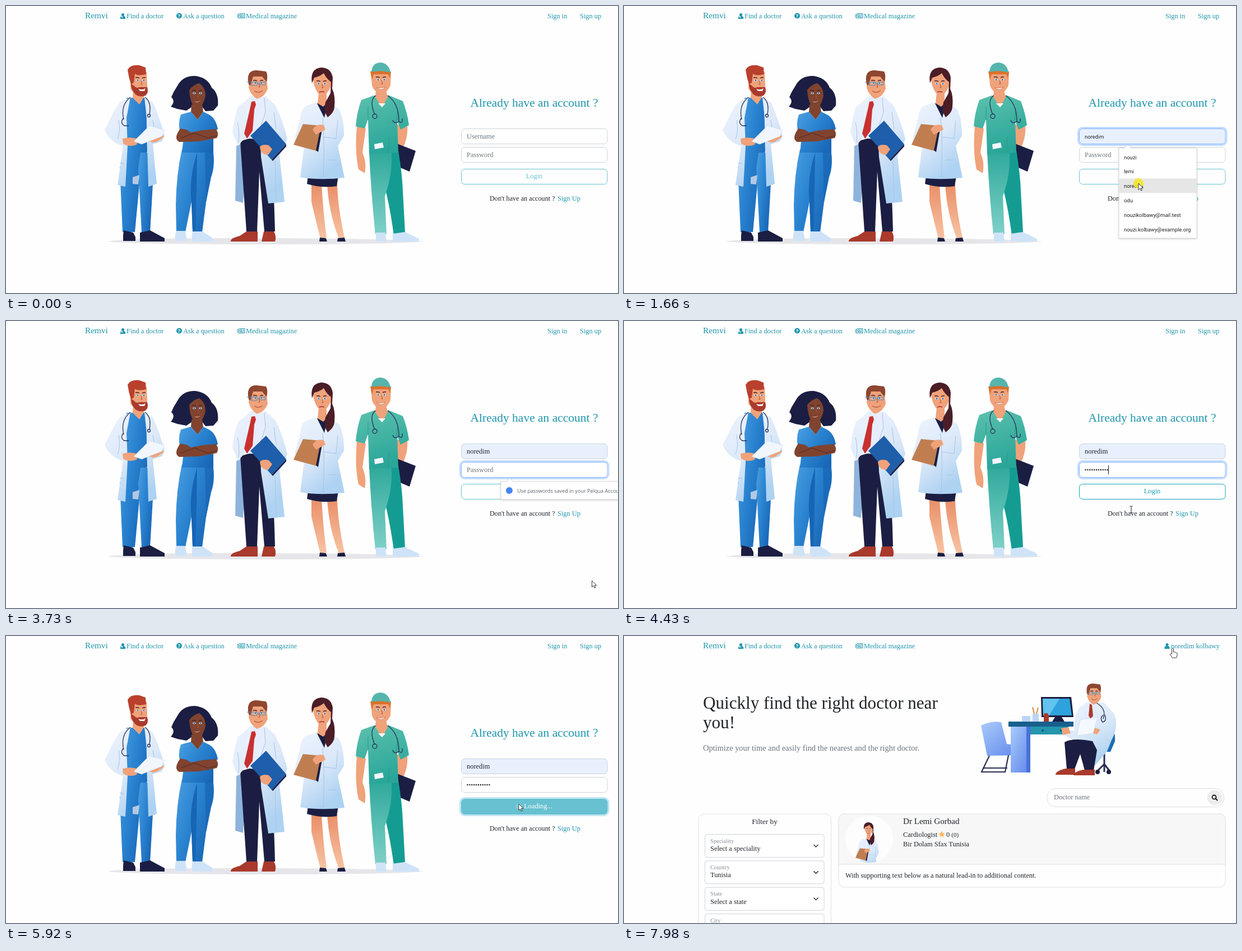
Animation of 1092 by 513 pixels, one loop 8 s. Source, as an HTML page:

```html
<!DOCTYPE html>
<html lang="en">
<head>
<meta charset="utf-8">
<title>Doctor finder</title>
<style>
html, body { margin: 0; width: 100%; height: 100%; overflow: hidden; background: #fefefe; }
svg { display: block; width: 100vw; height: 100vh; }
text { font: 12.4px "Liberation Serif", serif; fill: #212529; }
.teal, .teal text { fill: #2196ad; }
.gray { fill: #6c757d; }
.label { font-size: 10.6px; fill: #868d94; }
.ui text, text.ui { font: 9.4px Roboto, sans-serif; fill: #222; }
.mid { text-anchor: middle; }
.box { fill: #fff; stroke: #ced4da; }
.card { fill: none; stroke: #dfdfdf; }
.pop { fill: #fff; stroke: #d9d9d9; filter: drop-shadow(0 1px 1.5px #0003); }
.ring { fill: none; stroke: #c2dbfe; stroke-width: 3; }
.line { fill: none; stroke: #2b2f55; stroke-width: 1.3; }
.fold { fill: none; stroke: #a9c3e6; }
.skin { fill: #f0a27a; }
.brown { fill: #80432f; }
.navy { fill: #1b1e42; }
.red { fill: #a93a2c; }
.coat { fill: url(#coat); }
.blue { fill: url(#blue); }
.dark { fill: #1765b5; }
.green { fill: url(#green); }
.shoe { fill: #cfe3f8; }
</style>
</head>
<body>
<svg viewBox="0 0 1092 513" preserveAspectRatio="none">
<defs>
  <linearGradient id="coat" x2=".5" y2="1"><stop stop-color="#eef3fe"/><stop offset=".55" stop-color="#dce9f9"/><stop offset="1" stop-color="#aed2f2"/></linearGradient>
  <linearGradient id="blue" x2="1" y2=".7"><stop stop-color="#4a9fe2"/><stop offset=".5" stop-color="#2a83d0"/><stop offset="1" stop-color="#1765b5"/></linearGradient>
  <linearGradient id="green" x2=".3" y2="1"><stop stop-color="#5cc1ae"/><stop offset="1" stop-color="#2aa699"/></linearGradient>
  <linearGradient id="mint" x2="0" y2="1"><stop stop-color="#2fa99b"/><stop offset="1" stop-color="#7fd0c8"/></linearGradient>
  <linearGradient id="leg" x2="0" y2="1"><stop stop-color="#e98f68"/><stop offset="1" stop-color="#f8c3a3"/></linearGradient>
  <linearGradient id="sky" x2="1" y2="1"><stop stop-color="#a9cbfa"/><stop offset="1" stop-color="#5f86ec"/></linearGradient>
  <clipPath id="round"><circle cx="437.5" cy="363" r="42.5"/></clipPath>
  <g id="eyes">
    <path fill="#fff" d="M-8 1q3-4 6 0q-3 3-6 0M3 1q3-4 6 0q-3 3-6 0"/>
    <circle cx="-5" cy=".8" r="1.5" fill="#246fae"/><circle cx="6" cy=".8" r="1.5" fill="#246fae"/>
    <path fill="none" stroke="#4a2328" stroke-width="1.5" d="M-9-4q4-1 7 1M3-3q3-2 6-1"/>
    <path fill="none" stroke="#a5543c" d="M1 2l2 6h-3"/>
  </g>
  <g id="user"><circle cx="4.5" cy="2.6" r="2.6"/><path d="M0 10V8q0-3 3-3h3q3 0 3 3v2z"/></g>
</defs>

<g class="teal">
  <text x="141" y="22" style="font-size:15.3px">Remvi</text>
  <use href="#user" x="204" y="13"/><path stroke="#fff" d="M207 18v3M205.500 19.500h3"/>
  <text x="215" y="22">Find a doctor</text>
  <circle cx="309" cy="17.500" r="5"/><text x="309" y="21" class="mid" style="font:bold 9px Open Sans,sans-serif;fill:#fff">?</text>
  <text x="316" y="22">Ask a question</text>
  <path fill="none" stroke="#2196ad" d="M415.500 13.500h10.500v8h-11q-1.500 0-1.500-1.500v-5h2v5M417.500 15.500h3v2.500h-3zM422 15.500h2.500M422 17.500h2.500M417 19.500h7.500"/>
  <text x="428" y="22">Medical magazine</text>
</g>

<g id="login">
  <g class="teal"><text x="966" y="22">Sign in</text><text x="1024" y="22">Sign up</text></g>
  <path fill="#e6e6ea" d="M181 421Q210 414 460 415T747 421Q690 426 460 426T181 421z"/>

  <g id="bearded">
    <path class="blue" d="M203 290L208 404H230L239 308 238 288 252 260 250 164H215L212 250z"/>
    <path class="blue" d="M236 290L242 405H257L263 300 262 262 240 262z"/>
    <path class="navy" d="M210 401l17 4 4 8v7h-22v-10zM239 405l18-4 26 14v6h-44z"/>
    <path fill="#b3c8e4" d="M226 306l12-4-2 17-10-1z"/>
    <path class="coat" d="M222 163L203 172C192 186 186 204 176 221Q184 243 209 250L199 320 213 323 217 250 215 200zM247 163L262 172Q274 198 283 232L278 242 262 247 269 318 254 323 252 250 251 200z"/>
    <path class="fold" d="M201 204q4 20-2 34M262 204q4 18 0 42M203 280l8 2"/>
    <path class="skin" d="M227 148h19v15l-8 13-12-12zM208 237q16-4 28 1l-3 10q-14 5-24-2zM250 236l26-8 6 6-13 9q-14 3-19-7z"/>
    <path fill="#f1f6fd" stroke="#c9dcf1" stroke-width=".6" d="M228 242L256 214 283 222 278 233 242 247z"/>
    <path class="line" d="M222 163q-18 14-12 40M248 163q12 9 8 30M209 201q-6 8 2 13h8"/>
    <circle cx="255" cy="196" r="2.500" class="line"/>
    <path class="skin" d="M222 122v26q10 14 22 12q9-4 8-20l-1-22-21-6z"/>
    <path fill="#b9402c" d="M217 114q5-10 21-8l11 4 1 12q-15 4-20-1l-2 16-5 3q-4-12-6-26z"/>
    <path class="red" d="M223 139l6 4q3 5 9 2h14q3 10-3 15-10 4-18-2-8-8-8-19z"/>
    <path fill="#fff" d="M236 148q8 3 13-1l-2 5h-8z"/><use href="#eyes" x="240" y="132"/>
  </g>

  <g id="nurse">
    <path class="navy" d="M299 154L308 139Q318 124 338 125Q360 128 367 146Q380 156 378 178L370 187 356 188 350 180 332 180 322 187 306 184 294 180Q303 170 295 163z"/>
    <path class="blue" d="M314 256L369 255Q374 284 366 306L357 350 350 404H333L331 350 320 404H304L303 355Q304 300 314 256z"/>
    <path class="dark" d="M341 262Q326 310 331 350L333 404H338L340 330z"/><path class="dark" d="M355 262h14q4 20-4 46l-8 42z" opacity=".7"/>
    <path class="blue" d="M330 189L312 194Q307 208 310 222L318 224 314 262H370L370 226 378 220Q374 200 362 194L352 189 342 203z"/>
    <path class="brown" d="M331 176h19l2 13-10 14-12-14zM311 219q-13 18-2 24l36-1 31-6q5-9-2-16l-24 2-20 4-8-5z"/>
    <path fill="none" stroke="#53271f" d="M312 236l24-9 24 9 16-4"/>
    <path class="brown" d="M327 150q8-10 18-12q11 8 11 22-4 20-15 25-13-9-14-35z"/>
    <path fill="#eac3b8" d="M335 170q6 3 12-1-5 6-12 1z"/><use href="#eyes" x="341" y="155"/>
    <path class="shoe" d="M304 402h16l3 18h-20q-3-8 1-18zM333 403h18l18 12v6h-36q-3-8 0-18z"/>
  </g>

  <g id="senior">
    <path fill="#8fb4dc" d="M411 250l20-8-8 110-14-4z"/>
    <path class="navy" d="M418 242Q440 232 458 240L472 250Q478 320 480 403H461L452 296 448 403H429L424 330z"/>
    <path class="coat" d="M437 160L425 172 414 180Q407 200 404 226L414 250 426 236 430 190zM462 160L480 177Q492 198 502 238L488 268 497 350 468 353 455 270 452 190z"/>
    <path fill="#e6edfc" d="M437 161l24 2 2 70-5 6-34-3 7-48z"/>
    <path class="fold" d="M461 164l2 26-8 24M478 190l4 30M413 208q4 16 2 36M480 276l2 74"/>
    <path fill="#c9302f" d="M438 171l6-1 2 6-3 9-3 38-10 14-5-9 10-43z"/>
    <path fill="#1e5eab" d="M436 232L464 205 500 247 474 275z"/><path class="navy" d="M474 275l26-28v4l-24 26z"/>
    <path class="skin" d="M453 252q4-6 16-3l6 7-7 10q-14 0-15-14z"/>
    <g id="head">
      <path class="skin" d="M435 124H464L467 148Q462 162 448 166Q437 160 433 146z"/>
      <path fill="#8e4630" d="M432 134Q430 114 448 115L464 117Q468 124 465 136L457 126H441L436 142Q432 141 432 134z"/>
      <use href="#eyes" x="450" y="137"/>
      <path fill="none" stroke="#5188b4" d="M430 136h8v6h10v-6h-10M448 138h5M453 136h10v5h-10z"/>
      <path fill="none" stroke="#9d3c30" d="M443 152q8 5 15-1"/>
    </g>
    <path class="red" d="M429 403h20v18h-48q-1-6 16-10zM460 403h18q5 9 2 18h-24z"/>
  </g>

  <g id="woman">
    <path fill="url(#leg)" d="M545 318H563Q566 370 572 414L561 416Q552 380 545 350zM573 318H591Q592 360 604 414L594 416Q576 370 573 318z"/>
    <path class="navy" d="M539 304h54l-3 18q-27 4-53-4zM560 414l11 1 2 6h-14zM592 415l12-1 2 7h-15z"/>
    <path class="coat" d="M552 173L536 178Q527 182 525 200L516 234Q514 248 532 250L525 306Q560 312 604 307L592 250 603 232Q603 200 594 184L576 173z"/>
    <path class="fold" d="M565 200q4 50 1 108M574 275h15M592 205l-3 32-22-3"/>
    <path class="navy" d="M555 174h19l-6 26z"/><path class="skin" d="M558 154h14v20l-6 6-10-6z"/>
    <path fill="#c07e50" d="M513 248L530 211 562 214 554 259z"/><path class="navy" d="M553 258l9-44 3 1-8 46z"/>
    <path class="skin" d="M547 221q6-11 20-8l3 8-17 9z"/>
    <path class="skin" d="M547 126q13-12 31-4l3 18q-5 16-17 22-14-8-17-36z"/>
    <path fill="#4b1d26" d="M546 138Q542 112 562 110Q580 110 583 128L582 148Q588 160 586 180Q586 190 574 199Q566 188 570 172L579 156 580 136Q572 130 567 120Q560 126 550 128z"/>
    <use href="#eyes" x="563" y="138"/><path fill="none" stroke="#a32d36" stroke-width="1.500" d="M559 154q5-2 9 0"/>
  </g>

  <g id="surgeon">
    <path class="skin" d="M626 214L642 219 636 262Q644 280 640 299L629 292Q622 260 626 214zM698 212l18 2q2 21-9 42l-12-7z"/>
    <path class="navy" d="M695 245L731 259 720 296 692 284z"/>
    <path fill="#149c93" d="M670 260L700 258Q707 300 708 330L712 404 692 410Q684 350 672 310z"/>
    <path fill="url(#mint)" d="M648 260L688 262Q690 300 676 340L679 408H659Q651 330 648 260z"/>
    <path class="green" d="M656 160L634 168Q626 190 624 215L640 219 646 202 648 265 700 262 698 205 704 221 719 213Q716 190 708 170L684 160z"/>
    <path fill="none" stroke="#2b988c" d="M646 180v24M699 182l-2 24M684 234l-2 28"/>
    <path class="skin" d="M660 150h18l3 13-10 18-12-18z"/><path fill="#fff" d="M664 174h13l-6 7z"/>
    <path class="line" d="M660 160Q647 168 658 194M681 160q20 14 20 46M701 206q-8 6-11-2m11 2q7 6 6-5"/>
    <circle cx="658" cy="197" r="4" class="line"/>
    <path fill="#f4f7ff" d="M657 247l15-3 2 9-16 3z"/>
    <path class="skin" d="M651 118q17-6 36 0l-1 24q-6 14-18 16-12-6-15-16z"/>
    <path fill="#d9722e" d="M650 117q18-5 37 0l-2 12-3-7h-26l-3 10z"/>
    <path fill="#55b5ad" d="M652 118Q653 102 668 101Q683 102 686 119Q670 114 652 118z"/>
    <use href="#eyes" x="669" y="131"/><path fill="#fff" stroke="#b9573f" stroke-width=".6" d="M661 146q8 2 16-1-7 8-16 1z"/>
    <path class="shoe" d="M660 405h17l2 16h-19zM690 407l22-3 25 12v5h-47z"/>
  </g>

  <text x="942.500" y="180" class="teal mid" style="font-size:21.5px">Already have an account ?</text>
  <rect id="userBox" class="box" x="812.500" y="219.500" width="260.500" height="27" rx="6"/>
  <rect id="passBox" class="box" x="812.500" y="252.500" width="260.500" height="27" rx="6"/>
  <rect id="ring" class="ring" x="810.500" width="264.500" height="31" rx="8"/>
  <text id="userText" x="822" y="237"></text>
  <text id="passHint" x="822" y="270" class="gray">Password</text>
  <path id="dots" fill="none" stroke="#222" stroke-width="2.500" stroke-linecap="round" stroke-dasharray="0 3.900"/>
  <path id="caret" stroke="#111"/>
  <rect id="button" x="812.500" y="291.500" width="260.500" height="27" rx="6" stroke="#17a2b8"/>
  <circle id="spinner" cx="915" cy="304.500" fill="#fff"/>
  <text id="buttonText" y="308" class="mid"></text>
  <text x="863" y="347.500" style="font-size:12.2px">Don't have an account ?</text><text x="984" y="347.500" class="teal">Sign Up</text>
  <g id="list" class="ui">
    <path class="pop" d="M883 254H893L899 248 905 254H1022V415H883z"/>
    <rect id="hover" x="883" width="139" height="26" fill="#e6e6e6"/>
  </g>
  <g id="saved">
    <path class="pop" d="M883 287H893L899 281 905 287H1100V319H883z"/>
    <circle cx="898" cy="303" r="6" fill="#4285f4"/>
    <text x="912" y="306.500" style="font:9.1px Open Sans,sans-serif;fill:#5c6066">Use passwords saved in your Pelqua Account</text>
  </g>
</g>

<g id="finder">
  <g class="teal"><use href="#user" x="964.500" y="13"/><text x="976" y="22">noredim kolbawy</text></g>
  <text x="141" y="130" style="font-size:31.1px">Quickly find the right doctor near</text>
  <text x="141" y="165" style="font-size:31.1px">you!</text>
  <text x="141" y="204.500" class="gray" style="font-size:14.4px">Optimize your time and easily find the nearest and the right doctor.</text>
  <rect class="card" x="754.500" y="272.500" width="316" height="33" rx="16.500"/>
  <text x="767" y="292" class="gray">Doctor name</text>
  <circle cx="1054" cy="289" r="13.500" fill="#eceeec"/>
  <circle cx="1053" cy="288" r="3.500" fill="none" stroke="#111" stroke-width="1.800"/><path stroke="#111" stroke-width="2" d="M1055.500 290.500l3.500 3.500"/>
  <rect class="card" x="133" y="318" width="236.500" height="300" rx="10"/>
  <text x="251" y="336" class="mid" style="font-size:13.4px">Filter by</text>
  <g id="selects"></g>
  <g id="loaded">
    <path fill="url(#sky)" d="M637 160Q655 151 673 154L683 193 713 197 711 213 648 214z"/>
    <path class="line" style="stroke-width:2.2" d="M652 214L638 243H680L686 213M712 212V243M640 236H684"/>
    <path fill="url(#sky)" d="M690 162h34v82h-34z"/><path fill="#4871d8" d="M718 162h7v82h-7z"/>
    <path fill="#2596ad" d="M725 161h68v15h-68z"/><path fill="#185f8d" d="M686 153h116v9H686z"/>
    <circle cx="747" cy="169" r="2" fill="#0f5578"/><circle cx="780" cy="169" r="2" fill="#0f5578"/>
    <path class="navy" d="M744 109h54l4 36h-57zM769 145h12l5 8h-22z"/><path fill="#2da2dc" d="M747 112h48l4 30h-51z"/><path fill="#62c3ed" d="M747 112h30l-18 30h-11z"/>
    <path fill="#bcd5fb" d="M710 143h15v10h-15zM729 139h11v14h-11z"/><path stroke="#d68d3c" stroke-width="2" d="M732 139l-3-12M736 139l3-11"/>
    <path class="red" d="M750 138h6l2 5v10h-9v-10z"/>
    <path fill="#1c6eb4" d="M860 160Q878 164 876 188L868 207H842V200L862 196z"/>
    <path class="line" style="stroke-width:3" d="M857 207v24M857 229l-13 13M857 229l10 13M857 229v14"/>
    <path class="navy" d="M841 243a4 4 0 1 0 8 0a4 4 0 1 0-8 0M861 243a4 4 0 1 0 8 0a4 4 0 1 0-8 0"/>
    <path class="coat" d="M828 117L812 128Q800 150 804 170L784 166 782 176 806 188 818 198 840 232 862 206 870 186Q884 160 874 138L856 119z"/>
    <path class="navy" d="M786 190Q800 181 836 188L844 204 838 240H822L814 211 804 238H790z"/>
    <path class="red" d="M788 237h17v11h-35q0-7 18-11zM820 239h20v10h-38q2-7 18-10zM831 121l4 2 2 20-5 5-3-6z"/>
    <path class="skin" d="M780 165l13-2 4 11-14 3zM838 164l12 3-6 9-10-3z"/>
    <path fill="#f5f8ff" stroke="#c3d8f0" stroke-width=".6" d="M814 150L845 145 837 174 808 178z"/>
    <path class="line" d="M842 119Q862 130 855 148M855 141q-7 6-1 13q8-2 4-13"/>
    <use href="#head" transform="translate(506) scale(.74)"/>
    <path fill="#f7f7f7" d="M383 408V328q0-10 10-10h670q10 0 10 10v80z"/>
    <rect class="card" x="383" y="318" width="690" height="131" rx="10"/><path class="card" d="M383 408H1073"/>
    <circle cx="437.500" cy="363" r="42.500" fill="#fdfdfd"/>
    <g clip-path="url(#round)"><use href="#bust" transform="translate(177 282.400) scale(.46)"/></g>
    <text x="498" y="336" style="font-size:15.1px">Dr Lemi Gorbad</text>
    <text x="498" y="359">Cardiologist</text>
    <path fill="#ffb55a" d="M567 348.500l1.700 3.800 4.100.4-3.100 2.800.9 4-3.600-2.100-3.600 2.100.9-4-3.100-2.800 4.100-.4z"/>
    <text x="575" y="359">0 <tspan font-size="11">(0)</tspan></text>
    <text x="498" y="376">Bir Dolam Sfax Tunisia</text>
    <text x="395" y="432">With supporting text below as a natural lead-in to additional content.</text>
  </g>
</g>

<g id="pointer">
  <circle id="click" r="9" fill="#f3e52b" fill-opacity=".9"/>
  <path id="arrow" fill="#fff" stroke="#222" stroke-width=".9" d="M0 0V11.500L2.800 9 4.600 13 6.500 12.200 4.700 8.300H8.200z"/>
  <path id="beam" fill="none" stroke="#222" d="M-2.500-6h2L0-5.500 .5-6h2M0-5.500V5.500M-2.500 6h2L0 5.500 .5 6h2"/>
  <path id="hand" fill="#fff" stroke="#222" stroke-width=".9" d="M-1.500 9V0q1.500-2 3 0V6q1.500-1.500 2.500.5 1.500-1 2.300.6 1.700-.6 1.700 1.200V12l-1.500 4H-.5L-4.500 10q0-2 3-1z"/>
</g>
</svg>
<script>
const LOOP = 8000, FOCUS = 840, LIST = 975, PICK = 1730, PASS = 2090, SAVED = 2200, TYPE = 4010,
      SUBMIT = 5240, FINDER = 5930, LOADED = 6120;
const USERS = ['nouzi', 'lemi', 'noredim', 'odu', 'nouzikolbawy@mail.test', 'nouzi.kolbawy@example.org'];
const ROW = 25.9;
const CLICKS = [[FOCUS, 975], [1620, PICK], [2020, 2150], [SUBMIT, 5295]];
// time, x, y
const PATH = [
  [70, 1036, 474], [800, 900, 236], [1110, 900, 236], [1560, 918, 317], [PICK, 918, 317],
  [2030, 883, 263], [2770, 883, 263], [2960, 891, 277], [3120, 891, 277], [3960, 1080, 506],
  [4430, 905, 337], [4770, 914, 300], [6470, 915, 300],
  [6820, 962, 146], [6960, 962, 146], [7650, 980, 22], [7800, 980, 22], [7980, 979, 23], [LOOP + 1, 979, 23]
];

const $ = id => document.getElementById(id);
const show = (id, on) => { $(id).style.display = on ? '' : 'none'; };
const set = (id, attrs) => { for (const k in attrs) $(id).setAttribute(k, attrs[k]); };
const clamp = (v, max = 1) => Math.max(0, Math.min(max, v));
const inside = ([x, y], left, top, right, bottom) => x >= left && x <= right && y >= top && y <= bottom;

$('list').innerHTML += USERS.map((name, i) => `<text x="892" y="${273.5 + ROW * i}">${name}</text>`).join('');
$('selects').innerHTML = [['Speciality', 'Select a speciality'], ['Country', 'Tunisia'], ['State', 'Select a state'], ['City', '']]
  .map(([label, value], i) => `<g transform="translate(144.500 ${354.5 + 47.4 * i})">
    <rect class="box" width="212.500" height="41" rx="4"/><text class="label" x="9.500" y="15">${label}</text>
    <text class="value" x="9.500" y="29.500">${value}</text>
    <path fill="none" stroke="#333" stroke-width="1.500" d="M194 18.500l4 4 4-4"/></g>`).join('');

// The card portrait repeats one of the standing figures.
const bust = $('woman').cloneNode(true);
bust.id = 'bust';
document.querySelector('defs').append(bust);

function pointerAt(t) {
  const i = Math.max(1, PATH.findIndex(p => p[0] > t));
  const [t0, x0, y0] = PATH[i - 1], [t1, x1, y1] = PATH[i];
  const u = clamp((t - t0) / (t1 - t0)), e = u * u * (3 - 2 * u);
  return [x0 + (x1 - x0) * e, y0 + (y1 - y0) * e];
}

function drawLogin(t, at) {
  const listOpen = t >= LIST && t < PICK, savedOpen = t >= SAVED && t < TYPE;
  const row = listOpen && inside(at, 883, 257, 1022, 412) ? Math.floor((at[1] - 257) / ROW) : -1;
  const picked = t >= PICK, preview = row >= 0, loading = t >= SUBMIT;
  $('userText').textContent = picked ? USERS[2] : preview ? USERS[row] : 'Username';
  set('userText', { class: picked ? '' : preview ? 'ui' : 'gray' });

  const userFocus = t >= FOCUS && t < PASS, passFocus = t >= PASS && !loading;
  const focusedAt = loading ? SUBMIT : passFocus ? PASS : FOCUS;
  $('userBox').style.fill = picked || preview ? '#e8f0fe' : '';
  $('userBox').style.stroke = userFocus && t > FOCUS + 50 ? '#86b7fe' : '';
  $('passBox').style.stroke = passFocus ? '#86b7fe' : '';
  set('ring', { y: loading ? 289.5 : passFocus ? 250.5 : 217.5, opacity: clamp((t - focusedAt) / 110) });
  $('ring').style.stroke = loading ? '#c3e4f2' : '';

  const typed = clamp(Math.ceil((t - TYPE) / 36), 11);
  show('passHint', !typed);
  show('dots', typed);
  set('dots', { d: `M823.500 266h${3.9 * (typed - 1) + .1}` });
  const blinkFrom = userFocus ? FOCUS : typed ? TYPE + 396 : 2120;
  const caretOn = t < blinkFrom || Math.floor((t - blinkFrom) / 500) % 2 === 0;
  show('caret', caretOn && (passFocus || userFocus && !preview && !picked));
  set('caret', { d: `M${821.5 + (typed ? 3.9 * typed : 0)} ${userFocus ? 225 : 258}v16` });

  const hovered = typed && inside(at, 812, 291, 1073, 319);
  set('button', { fill: loading || hovered ? '#17a2b8' : '#fff', opacity: typed && !loading ? 1 : .65 });
  set('buttonText', { x: loading ? 949.5 : 942.5, opacity: typed ? 1 : .65 });
  $('buttonText').textContent = loading ? 'Loading...' : 'Login';
  $('buttonText').style.fill = loading || hovered ? '#fff' : '#17a2b8';
  const pulse = (t - SUBMIT) % 750 / 375;
  show('spinner', loading);
  set('spinner', { r: 5.5 * clamp(pulse), opacity: clamp(pulse < 1 ? pulse : 2 - pulse) });

  show('list', listOpen);
  show('hover', preview);
  set('hover', { y: 256.5 + ROW * row });
  show('saved', savedOpen);
  if (listOpen && inside(at, 883, 254, 1022, 415) || savedOpen && inside(at, 883, 287, 1092, 319)) return 'arrow';
  if (hovered) return loading ? 'arrow' : 'hand';
  const onText = inside(at, 812, 219, 1073, 247) || inside(at, 812, 252, 1073, 280) || inside(at, 863, 335, 981, 351);
  return onText ? 'beam' : 'arrow';
}

function drawFinder(t, at) {
  show('loaded', t >= LOADED);
  document.querySelectorAll('.value').forEach(v => { v.style.display = t >= LOADED ? '' : 'none'; });
  return inside(at, 754, 272, 1040, 306) ? 'beam' : at[1] < 30 ? 'hand' : 'arrow';
}

function frame(now) {
  const t = now % LOOP, at = pointerAt(t), onFinder = t >= FINDER;
  show('login', !onFinder);
  show('finder', onFinder);
  const shape = (onFinder ? drawFinder : drawLogin)(t, at);
  for (const id of ['arrow', 'beam', 'hand']) show(id, id === shape);
  show('click', CLICKS.some(([from, to]) => t >= from && t < to));
  show('pointer', t >= 70);
  set('pointer', { transform: `translate(${at})` });
  requestAnimationFrame(frame);
}
requestAnimationFrame(frame);
</script>
</body>
</html>
```
